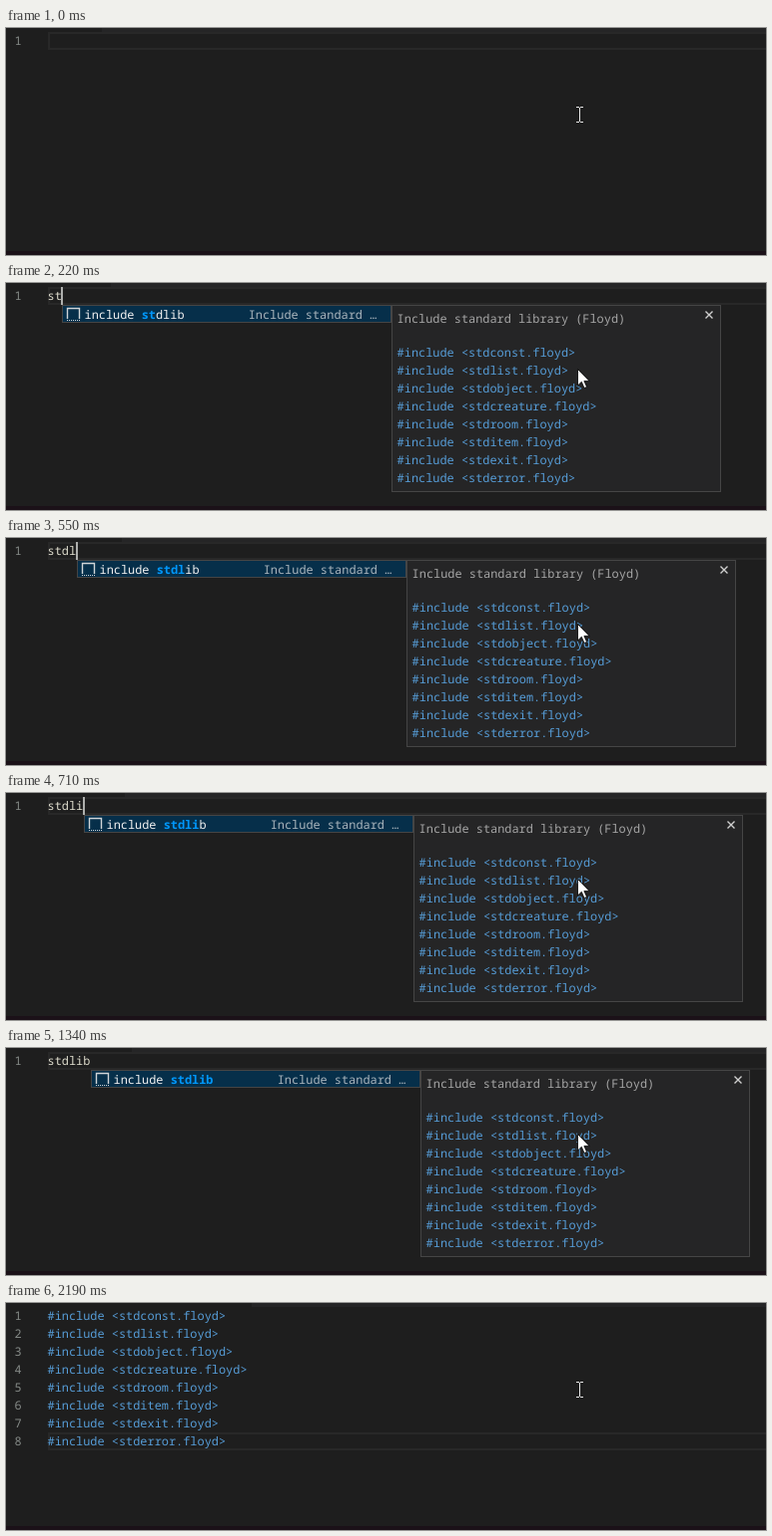
Recreate the animation shown at these times as an HTML page. Size 761 px wide and 228 px high, loop 2.32 s.

```html
<!DOCTYPE html>
<html lang="en">
<head>
<meta charset="utf-8">
<title>Snippet completion</title>
<style>
  html, body { margin: 0; width: 100%; height: 100%; overflow: hidden; background: #1e1e1e; }
  svg { display: block; width: 761px; height: 228px; }
  text {
    font: 11.912px "Noto Sans Mono", "DejaVu Sans Mono", monospace;
    text-rendering: geometricPrecision;
    white-space: pre;
  }
  .number { fill: #858a87; }
  .typed { fill: #dcdacb; }
  .code { fill: #dcdcdc; }
  .blue { fill: #569cd6; }
  .match { fill: #0097fb; font-weight: 700; }
  .label { fill: #f0f0f0; }
  .detail { fill: #a9b4bc; }
  .summary { fill: #a5a5a5; }
</style>
</head>
<body>
<svg viewBox="0 0 761 228">
  <rect width="761" height="228" fill="#1e1e1e"/>
  <rect id="tabs" width="761" height="4" fill="#252526"/>
  <rect y="224" width="761" height="4" fill="#1b1118"/>
  <rect id="activeLine" x="43" y="5" width="740" height="16" fill="none" stroke="#282828" stroke-width="2"/>
  <g id="numbers"></g>
  <text id="typed" class="typed" x="41.5" y="17"></text>
  <g id="inserted"></g>
  <rect id="caret" width="2" height="18" fill="#aeafad"/>

  <g id="popup">
    <rect x=".5" y="22.5" width="329" height="17" fill="#062f4a" stroke="#454545"/>
    <path d="M5.5 36V25.5H17.5V36" fill="none" stroke="#d0d4d7" stroke-width="1.4"/>
    <path d="M5 37.5H18" stroke="#d0d4d7" stroke-dasharray="1 1"/>
    <text class="label" x="22.5" y="36">include <tspan id="matched" class="match"></tspan><tspan id="rest"></tspan></text>
    <text class="detail" x="186.7" y="36">Include standard …</text>
    <rect x="330.5" y="22.5" width="329" height="187" fill="#252526" stroke="#454545"/>
    <text class="summary" x="335.6" y="40">Include standard library (Floyd)</text>
    <path d="M644.5 28.5l7 7m0-7l-7 7" stroke="#d0d0d0" stroke-width="1.4"/>
    <g id="preview"></g>
  </g>

  <path id="beam" d="M571 79.5h3m1 0h3M574.5 80v14M571 94.5h3m1 0h3" fill="none" stroke="#e8e8e8"/>
  <path id="arrow" d="M572.5 86.5v16.5l3.8-3.7 2.7 6.2 2.6-1.1-2.7-6h5.2z" fill="#fff" stroke="#000" stroke-width=".8"/>
</svg>
<script>
const LOOP = 2320;
const ADVANCE = 7.147;
const LINE = 18;
const WORD = "stdlib";
const KEY_TIMES = [50, 220, 430, 550, 710, 840];
const TAB_EDGES = [96, 100, 105, 113, 116, 119, 126];
const POPUP_AT = 70, ACCEPT_AT = 1690, COLOR_AT = 1730;
const includes = ["const", "list", "object", "creature", "room", "item", "exit", "error"]
  .map(name => `#include <std${name}.floyd>`);

const $ = id => document.getElementById(id);
const set = (id, name, value) => $(id).setAttribute(name, value);
const show = (id, visible) => set(id, "visibility", visible ? "visible" : "hidden");

function addLines(id, lines, x, y, className) {
  lines.forEach((line, i) => {
    const text = document.createElementNS("http://www.w3.org/2000/svg", "text");
    text.setAttribute("x", x);
    text.setAttribute("y", y + i * LINE);
    text.setAttribute("class", className);
    text.textContent = line;
    $(id).append(text);
  });
}

addLines("numbers", includes.map((_, i) => i + 1), 8.5, 17, "number");
addLines("inserted", includes, 41.5, 17, "");
addLines("preview", includes, 335.6, 74, "blue");

function render(time) {
  const accepted = time >= ACCEPT_AT;
  const suggesting = time >= POPUP_AT && !accepted;
  const count = KEY_TIMES.filter(key => time >= key).length;
  const column = accepted ? includes.at(-1).length : count;
  const top = accepted ? 7 * LINE : 0;
  const tabEdge = accepted ? 246 : TAB_EDGES[count];

  set("tabs", "x", tabEdge);
  set("activeLine", "y", 5 + top);
  [...$("numbers").children].forEach((number, i) => {
    number.style.display = accepted || i === 0 ? "" : "none";
  });

  $("typed").textContent = accepted ? "" : WORD.slice(0, count);
  show("inserted", accepted);
  for (const line of $("inserted").children) {
    line.setAttribute("class", time >= COLOR_AT ? "blue" : "code");
  }

  set("caret", "x", Math.floor(41.5 + column * ADVANCE));
  set("caret", "y", 4 + top);
  show("caret", accepted ? time < 2190 : time >= 50 && time < 1340);

  set("popup", "transform", `translate(${Math.round(42 + count * ADVANCE)})`);
  $("matched").textContent = WORD.slice(0, count);
  $("rest").textContent = WORD.slice(count);
  show("popup", suggesting);
  show("arrow", suggesting);
  show("beam", !suggesting);
}

const start = performance.now();
function tick() {
  render((performance.now() - start) % LOOP);
  requestAnimationFrame(tick);
}
tick();
</script>
</body>
</html>
```
